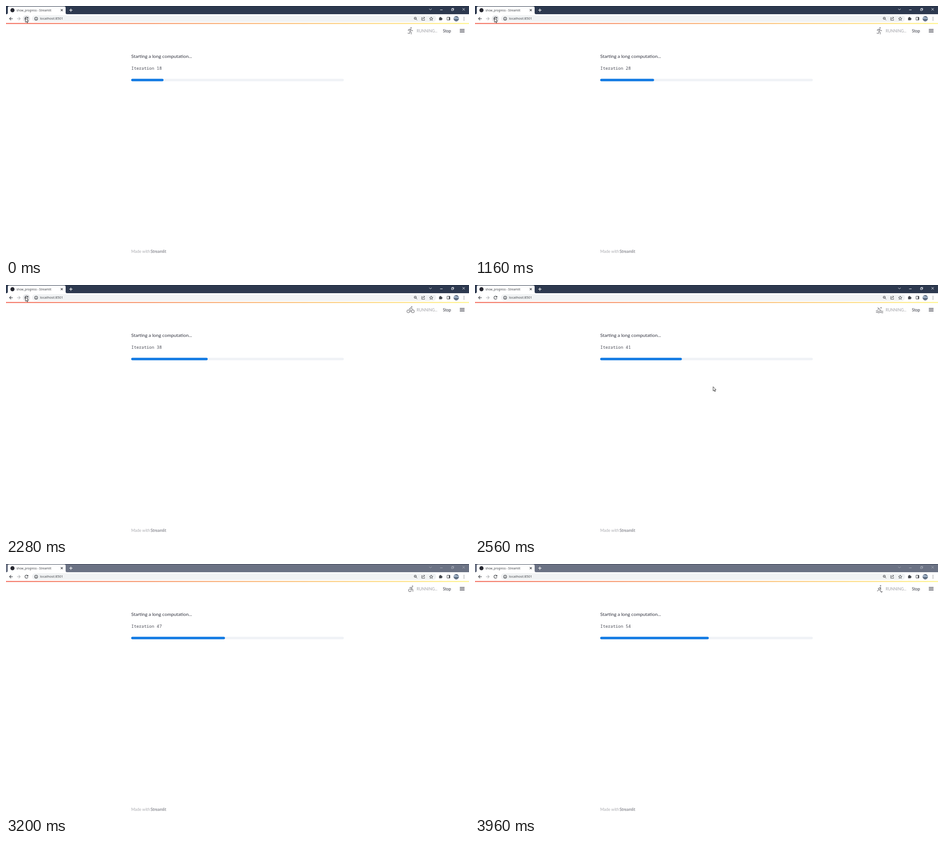
Recreate the animation shown at these times as an HTML page. Size 1017x551 px, loop 4000 ms.

```html
<!DOCTYPE html>
<html lang="en">
<head>
<meta charset="utf-8">
<title>show_progress</title>
<style>
  html, body { margin: 0; width: 100%; height: 100%; overflow: hidden; background: #fff; }
  svg { display: block; }
  .line { fill: none; stroke: #474a4f; stroke-width: 1.2; }
  .lato { font-family: Lato, sans-serif; fill: #31333f; }
  .noto { font-family: "Noto Sans", sans-serif; fill: #45484d; }
  .mono { font: 9.3px "Noto Sans Mono", monospace; fill: #4a4c56; }
</style>
</head>
<body>
<svg width="1017" height="551" viewBox="0 0 1017 551">
  <defs>
    <linearGradient id="stripe">
      <stop stop-color="#f2604f"/><stop offset="1" stop-color="#fff27d"/>
    </linearGradient>
    <clipPath id="round"><circle cx="989" cy="28" r="5.8"/></clipPath>
  </defs>

  <!-- Title bar and tab -->
  <rect id="titlebar" width="1017" height="18"/>
  <rect width="1017" height="1" fill="#101a2c" opacity=".55"/>
  <path d="M1 18q3 0 3-3V4q0-3 3-3h121q3 0 3 3v11q0 3 3 3z" fill="#fff"/>
  <circle cx="14.2" cy="9.2" r="4.5" fill="#262730"/>
  <text class="noto" x="23" y="11.6" font-size="6.3">show_progress - Streamlit</text>
  <path class="line" d="M120.3 7l4.4 4.4m0-4.4l-4.4 4.4"/>
  <path class="line" style="stroke:#fff" d="M139 9.2h7m-3.5-3.5v7"/>
  <g id="controls" fill="none" stroke-width="1">
    <path d="M929.5 6l2.8 2.8L935.100 6M953.500 8.500h5.500M1002.800 4.800l5 5m0-5l-5 5"/>
    <path d="M978.500 6.500h3.600v3.600h-3.600zM979.800 6.300V5.200h3.700v3.700h-1.200"/>
  </g>

  <!-- Toolbar -->
  <rect x="57" y="20.300" width="888" height="14.600" rx="7.300" fill="#f1f3f4"/>
  <circle id="hover" cx="45" cy="28" r="8" fill="#e6e7e9"/>
  <path class="line" d="M14.800 27.800H7.800m3.400-3.500l-3.500 3.500 3.500 3.500"/>
  <path class="line" style="stroke:#b4b6b9" d="M24.200 27.800h7m-3.400-3.500l3.500 3.500-3.500 3.500"/>
  <path class="line" d="M47.900 26a3.400 3.400 0 1 0 .4 2.800"/>
  <path d="M48.900 23.800v3.500h-3.500z" fill="#474a4f"/>
  <circle class="line" cx="66.200" cy="27.800" r="3.300" stroke-width="1"/>
  <path class="line" d="M66.200 27.300v2.400m0-4.200v1"/>
  <text class="noto" x="74.700" y="30.400" font-size="7.500">localhost:8501</text>
  <g class="line" style="stroke-width:1">
    <path d="M900.800 29l2.400 2.400M897.500 27h3"/>
    <circle cx="899" cy="27" r="2.500"/>
    <path d="M915 25.500h-1.800v5.700h6.300v-2M915 29q.5-3.200 4-3.200m-1.500-2l2.500 2-2.500 2"/>
    <path d="M934 24.200l1.100 2.600 2.800.2-2.200 1.800.7 2.700-2.400-1.500-2.400 1.500.7-2.700-2.200-1.800 2.800-.2z"/>
    <path d="M968.800 24.700h6.200v6.200h-6.200z"/>
  </g>
  <g fill="#474a4f">
    <path d="M951.300 25.500h6v5.800h-6z"/>
    <circle cx="954.300" cy="25.300" r="1.300"/><circle cx="957.500" cy="28.400" r="1.300"/>
    <path d="M972.700 24.700h2.500v6.200h-2.500z"/>
    <circle cx="1006" cy="25" r=".8"/><circle cx="1006" cy="28" r=".8"/><circle cx="1006" cy="31" r=".8"/>
  </g>
  <g clip-path="url(#round)">
    <path d="M983 22h12v12h-12z" fill="#47566c"/>
    <path d="M983 25.500l4-1.500 8 2v2.500h-12z" fill="#a9bbcf"/>
    <path d="M984 30h10v1.500h-10z" fill="#8291a4"/>
  </g>

  <!-- Page -->
  <rect y="37.400" width="1017" height="2" fill="url(#stripe)"/>
  <g id="activity" transform="translate(880 45.600) scale(.72)" fill="#8e8e92" stroke="#8e8e92">
    <circle id="head" stroke="none"/>
    <path id="limbs" fill="none" stroke-width="2"/>
  </g>
  <g class="lato">
    <text x="902" y="57.500" font-size="8.500" opacity=".45">RUNNING...</text>
    <text x="959.800" y="57.500" font-size="8.900">Stop</text>
    <path d="M996.800 50.800h10.400v1.300h-10.400zm0 3h10.400v1.300h-10.400zm0 3h10.400v1.300h-10.400z"/>
    <text x="275" y="113.700" font-size="10.400">Starting a long computation...</text>
    <text x="275" y="541.500" font-size="8.850" opacity=".4">Made with</text>
    <text x="317.400" y="541.500" font-size="8.850" opacity=".72">Streamlit</text>
  </g>
  <text class="mono" id="iteration" x="275.300" y="139.500"></text>
  <rect x="275" y="159.800" width="467" height="5.400" rx="2.700" fill="#f0f2f6"/>
  <rect id="bar" x="275" y="159.800" height="5.400" rx="2.700" fill="#147be3"/>

  <path id="cursor" d="M0 0v9.300l2.100-1.900 1.500 3.300 1.500-.7-1.500-3.200h2.900z" fill="#fff" stroke="#222" stroke-width=".9"/>
</svg>
<script>
const $ = id => document.getElementById(id);
const set = (id, attrs) => {
  for (const name in attrs) $(id).setAttribute(name, attrs[name]);
};

const LOOP = 4000, STEP = 40, BLUR_AT = 3000, LEAVE_AT = 2400;

// Activities on a 24 unit grid: head x, head y, limbs
const activities = [
  [15, 3, "M4.700 19.700L9 15.600l1.500.7M7 11.400q3.500 0 6-3.300l1.500-1M13.700 7v5.500l2 2V7.500M8 11.500l8.700 8.700M16 21h4l-2 2z"],
  [12, 4, "M3 8h18M10 8v14M14 8v14M12 8v8"],
  [18, 4.5, "M10 13a4 4 0 1 0 4 4M9.200 10.200l1-2.200H16q1.300.5.8 1.800l-2.200 4.700H19V21M14 8.500l-2.200 5.500q0 1 1 1H15"],
  [15.5, 3.5, "M.8 17a4.200 4.200 0 1 0 8.400 0a4.200 4.200 0 1 0-8.400 0M14.800 17a4.200 4.200 0 1 0 8.400 0a4.200 4.200 0 1 0-8.400 0M12 19v-6.200L8.300 9.700 12.200 6 15 8.800q1.500 1.200 4.100 1.200"],
  [13.5, 3.5, "M5.300 13V9l5.500-2M11.800 7l-1.600 8M10 14l-1.100 6.300-5.700-1.100M10.300 13.500l3.700 3V23M12 7q2 5 7.300 5M10.500 7.500L9.600 13"],
  [16.5, 6, "M1 16q2.750-2 5.500 0t5.500 0 5.500 0 5.500 0M1 20.500q2.750-2 5.500 0t5.500 0 5.500 0 5.500 0M6 12.500l4-4 5 5M10 8.500L6 5.500"]
];

// Piecewise linear value through [time, value] points
function along(points, t) {
  const last = points.length - 1;
  if (t <= points[0][0]) return points[0][1];
  if (t >= points[last][0]) return points[last][1];
  const i = points.findIndex(p => p[0] > t);
  const [t0, a] = points[i - 1], [t1, b] = points[i];
  return a + (b - a) * (t - t0) / (t1 - t0);
}

const barWidth = [[0, 71], [720, 99], [1560, 136], [2280, 168], [2880, 192.5], [3200, 206], [3960, 238.5]];
const cursorX = [[LEAVE_AT, 43], [2720, 1003], [2880, 987.3], [3000, 985]];
const cursorY = [[LEAVE_AT, 26.5], [2720, 420], [2880, 533], [3000, 570]];

function draw(now) {
  const t = Math.floor(now % LOOP / STEP) * STEP;
  const active = t < BLUR_AT;

  $("iteration").textContent = "Iteration " + Math.floor(18.25 + t / 110.4);
  set("bar", { width: along(barWidth, t) });

  const [cx, cy, d] = activities[Math.floor((t + 860) / 200) % 6];
  set("head", { cx, cy, r: 2.1 });
  set("limbs", { d });

  set("titlebar", { fill: active ? "#2d394f" : "#6b7284" });
  set("controls", { stroke: active ? "#e4e7ed" : "#a4a9b5" });
  set("hover", { opacity: t <= LEAVE_AT ? 1 : 0 });
  set("cursor", { transform: `translate(${along(cursorX, t)} ${along(cursorY, t)})` });
  requestAnimationFrame(draw);
}
requestAnimationFrame(draw);
</script>
</body>
</html>
```
